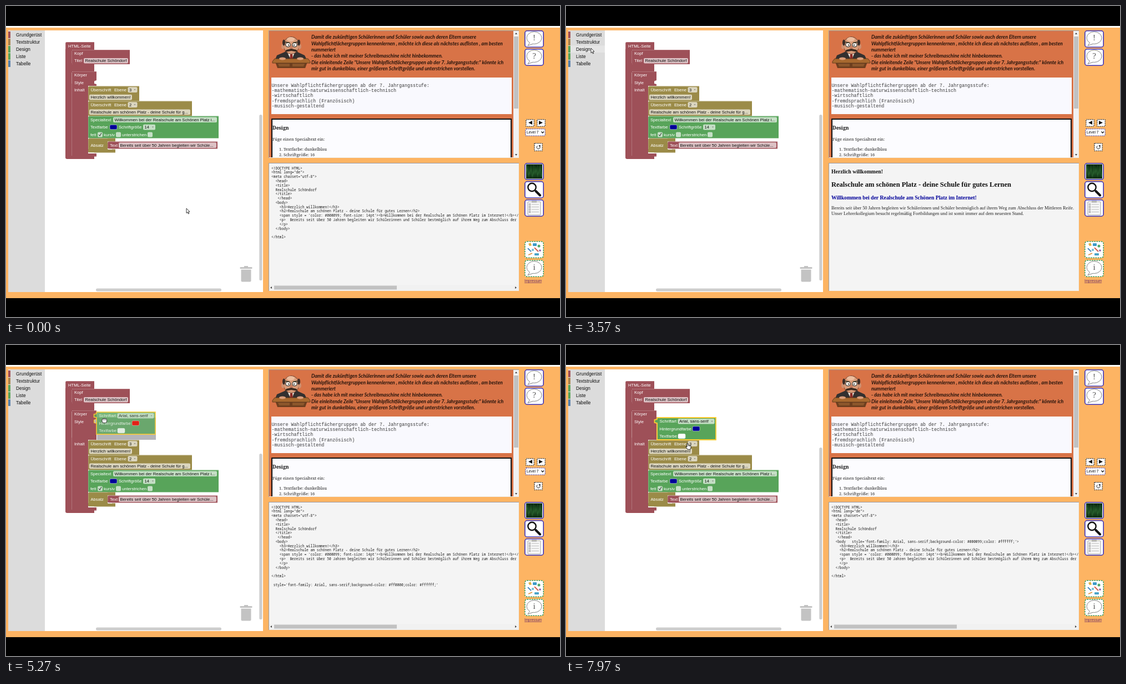
An HTML page with a canvas that plays this animation: 998x561 px, repeating every 8000 ms.

```html
<!DOCTYPE html>
<html lang="de">
<head>
<meta charset="utf-8">
<title>Blockeditor</title>
<style>
html, body { margin: 0; width: 100%; height: 100%; overflow: hidden; background: #000; }
canvas { display: block; }
</style>
</head>
<body>
<canvas id="stage" width="998" height="561"></canvas>
<script>
const c = document.getElementById('stage').getContext('2d');
const LOOP = 8000;
const SANS = '"Liberation Sans", Arial, sans-serif';
const SERIF = '"Liberation Serif", Times, serif';
const BOOK = '"Noto Serif", serif';
const MONO = '"Noto Sans Mono", monospace';
const COURIER = '"Liberation Mono", monospace';
const RED = '#9e5058', OLIVE = '#9b8b48', GREEN = '#58a45a', ORANGE = '#fdb463', NAVY = '#000099';
const GOLD = '#fc3';

// Moments at which the picture switches
const T = { render: 1680, hover: 3400, flyout: 3820, grab: 4420, preview: 4980,
            drop: 5520, picker: 6480, pick: 7540 };

// time, x, y of the pointer
const PATH = [[30, 325, 365], [1150, 947, 328], [1330, 948, 330], [2500, 948, 330], [3300, 41, 79],
  [3560, 45, 76], [3770, 45, 76], [4380, 98, 120], [4670, 109, 120], [5270, 175, 135],
  [5450, 176, 145], [5640, 176, 145], [6200, 233, 151], [6520, 235, 152], [6830, 263, 198],
  [7090, 257, 243], [7230, 257, 244], [7540, 257, 244], [7960, 219, 177]];

const PALETTE = ('fff ccc bbb 999 666 333 000 fcc f66 f00 c00 900 600 300 fc9 f96 f90 f60 c60 930 630 ' +
  'ff9 ff6 fc6 fc3 c93 963 633 ffc ff3 ff0 fc0 990 660 330 9f9 6f9 3f3 3c0 090 060 030 ' +
  '9ff 3ff 6cc 0cc 399 366 033 cff 6ff 3cf 36f 33f 009 006 ccf 99f 66c 63f 60c 339 309 ' +
  'fcf f9f c6c c3c 939 636 303').split(' ');

function pointer(t) {
  let i = PATH.findIndex(k => k[0] > t);
  if (i < 0) i = PATH.length;
  const a = PATH[Math.max(0, i - 1)], b = PATH[Math.min(i, PATH.length - 1)];
  if (a === b) return [a[1], a[2]];
  const u = Math.max(0, Math.min(1, (t - a[0]) / (b[0] - a[0])));
  const e = u * u * (3 - 2 * u);
  return [a[1] + (b[1] - a[1]) * e, a[2] + (b[2] - a[2]) * e];
}

function rect(x, y, w, h, fill) {
  c.fillStyle = fill;
  c.fillRect(x, y, w, h);
}
function round(x, y, w, h, r, fill, stroke, lw = 1) {
  c.beginPath();
  c.roundRect(x, y, w, h, r);
  if (fill) { c.fillStyle = fill; c.fill(); }
  if (stroke) { c.strokeStyle = stroke; c.lineWidth = lw; c.stroke(); }
}
function oval(x, y, rx, ry, fill, stroke, lw = 1) {
  c.beginPath();
  c.ellipse(x, y, rx, ry, 0, 0, 7);
  if (fill) { c.fillStyle = fill; c.fill(); }
  if (stroke) { c.strokeStyle = stroke; c.lineWidth = lw; c.stroke(); }
}
function poly(pts, fill, stroke, lw = 1) {
  c.beginPath();
  for (let i = 0; i < pts.length; i += 2) c.lineTo(pts[i], pts[i + 1]);
  c.closePath();
  if (fill) { c.fillStyle = fill; c.fill(); }
  if (stroke) { c.strokeStyle = stroke; c.lineWidth = lw; c.stroke(); }
}
function line(x1, y1, x2, y2, color, lw = 1) {
  c.beginPath();
  c.moveTo(x1, y1);
  c.lineTo(x2, y2);
  c.strokeStyle = color;
  c.lineWidth = lw;
  c.stroke();
}
function text(s, x, y, size, family, color, style = '') {
  c.font = `${style} ${size}px ${family}`;
  c.fillStyle = color;
  c.fillText(s, x, y + 0.4);
}
function clipped(x, y, w, h, draw) {
  c.save();
  c.beginPath();
  c.rect(x, y, w, h);
  c.clip();
  draw();
  c.restore();
}
function inset(x, y, w, h) {
  rect(x, y + h - 1, w, 1, '#ededed');
  rect(x + w - 1, y, 1, h, '#ededed');
  rect(x, y, w, 1, '#9a9aa2');
  rect(x, y, 1, h, '#9a9aa2');
}

// Block parts
const label = (s, x, y) => text(s, x, y, 7.65, SANS, '#fff');
function block(x, y, w, h, fill) {
  round(x, y, w, h, [3, 0, 0, 2], fill);
  line(x + 2, y + 0.5, x + w, y + 0.5, 'rgba(255,255,255,.2)');
  line(x + 0.5, y + 2, x + 0.5, y + h - 2, 'rgba(255,255,255,.2)');
}
function field(s, x, y, w) {
  round(x, y - 4.7, w, 9.6, 2, 'rgba(255,255,255,.65)');
  text(s, x + 2.5, y, 7.65, SANS, '#111');
}
function dropdown(s, x, y, w) {
  field(s, x, y, w);
  poly([x + w - 6, y - 1, x + w - 3, y - 1, x + w - 4.5, y + 1.3], '#888');
}
function swatch(x, y, fill) {
  round(x, y - 4.2, 13, 8.4, 2, fill, 'rgba(255,255,255,.6)', 0.8);
}
function check(x, y, on) {
  round(x, y - 4.5, 9, 9, 2, 'rgba(255,255,255,.65)');
  if (on) {
    c.beginPath();
    c.moveTo(x + 2, y); c.lineTo(x + 4, y + 2.3); c.lineTo(x + 7, y - 3);
    c.strokeStyle = '#222'; c.lineWidth = 1; c.stroke();
  }
}
function special(x, y, s, fieldW, w, color) {
  block(x, y, w, 40, GREEN);
  label('Specialtext', x + 4, y + 6.7);
  field(s, x + 45, y + 6.7, fieldW);
  label('Textfarbe', x + 4, y + 20);
  swatch(x + 39, y + 20, color);
  label('Schriftgröße', x + 55, y + 20);
  dropdown('14', x + 99, y + 20, 22);
  label('fett', x + 4, y + 33.5);
  check(x + 17, y + 33.5, true);
  label('kursiv', x + 28, y + 33.5);
  check(x + 50, y + 33.5);
  label('unterstrichen', x + 61, y + 33.5);
  check(x + 107, y + 33.5);
}
function stylePath(x, y) {
  c.beginPath();
  c.moveTo(x, y); c.lineTo(x + 106, y); c.lineTo(x + 106, y + 40); c.lineTo(x, y + 40);
  c.lineTo(x, y + 10); c.lineTo(x - 4.5, y + 9); c.lineTo(x - 4.5, y + 4); c.lineTo(x, y + 3);
  c.closePath();
}
function styleBlock(x, y, back, selected) {
  stylePath(x, y);
  c.fillStyle = GREEN;
  c.fill();
  if (selected) { c.strokeStyle = GOLD; c.lineWidth = 1.8; c.stroke(); }
  label('Schriftart', x + 4.5, y + 6.7);
  dropdown('Arial, sans-serif', x + 37.5, y + 6.7, 66);
  label('Hintergrundfarbe', x + 4.5, y + 20);
  swatch(x + 64, y + 20, back);
  label('Textfarbe', x + 4.5, y + 33.5);
  swatch(x + 38, y + 33.5, '#fff');
}

function program(t) {
  const d = t >= T.preview ? 27 : 0;
  // page frame
  block(107, 65, 52, 14, RED);
  rect(107, 78, 12, 194 + d, RED);
  rect(107, 105, 52, 13, RED);
  round(107, 269 + d, 52, 7, [0, 0, 0, 3], RED);
  label('HTML-Seite', 112, 72);
  block(118, 79, 105, 26, RED);
  label('Kopf', 123, 85.3);
  label('Titel', 123, 98.7);
  field('Realschule Schöndorf', 140, 98.7, 80);
  // body
  block(118, 118, 45, 26 + d, RED);
  rect(118, 140 + d, 30, 128, RED);
  round(118, 266 + d, 45, 5.5, [0, 0, 0, 2], RED);
  line(118.5, 120, 118.5, 270 + d, 'rgba(255,255,255,.2)');
  label('Körper', 123, 124.5);
  label('Style', 123, 138);
  if (t < T.drop) {
    const notch = [163, 134, 159, 135.5, 159, 140, 163, 141];
    poly(notch, '#fff', d ? GOLD : null, 1.8);
  }
  label('Inhalt', 123, 151 + d);
  block(148, 144.5 + d, 92, 27, OLIVE);
  label('Überschrift', 152.5, 151 + d);
  label('Ebene', 195, 151 + d);
  dropdown('3', 219.5, 151 + d, 17);
  field('Herzlich willkommen!', 150, 164.5 + d, 77);
  block(148, 171.5 + d, 187, 27, OLIVE);
  label('Überschrift', 152.5, 178 + d);
  label('Ebene', 195, 178 + d);
  dropdown('2', 219.5, 178 + d, 17);
  field('Realschule am schönen Platz - deine Schule für g...', 150, 191.3 + d, 182);
  special(148, 198.5 + d, 'Willkommen bei der Realschule am Schönen Platz i...', 187, 235, NAVY);
  block(148, 238.5 + d, 35, 22, OLIVE);
  rect(183, 238.5 + d, 14, 6, OLIVE);
  round(148, 258.5 + d, 49, 6, [0, 0, 0, 2], OLIVE);
  label('Absatz', 152.5, 251 + d);
  block(183, 244.5 + d, 198, 13, RED);
  // open connections below the last blocks
  line(184, 258 + d, 191, 258.5 + d, '#fff', 1.2);
  line(150, 265 + d, 159, 265.3 + d, '#fff', 1.6);
  label('Text', 187, 251 + d);
  field('Bereits seit über 50 Jahren begleiten wir Schüle...', 203, 251 + d, 176);
}

function picker() {
  round(196, 163.5, 78, 109, 2, '#fff', '#bbb', 0.8);
  poly([229, 164, 235, 158, 241, 164], '#fff');
  PALETTE.forEach((p, i) =>
    rect(198.3 + (i % 7) * 10.4, 167.2 + Math.floor(i / 7) * 10.58, 9.6, 9.7, '#' + p));
}

function editor(t, [px, py]) {
  const open = t >= T.flyout && t < T.grab;
  rect(4, 44, 66, 472, '#dcdcdc');
  rect(70, 44, 393, 472, '#fff');
  ['Grundgerüst', 'Textstruktur', 'Design', 'Liste', 'Tabelle'].forEach((s, i) => {
    const y = 52 + 13 * i, col = [RED, '#a5814f', GREEN, GREEN, '#5580ad'][i];
    const on = i === 2 && open;
    if (i === 2 && t >= T.hover && t < T.flyout) rect(8, y - 6.5, 62, 12.5, 'rgba(255,255,255,.25)');
    if (on) rect(4, y - 6.5, 66, 12.5, col);
    rect(4, y - 6, 4, 12, col);
    text(s, 18, y, 8.34, SANS, on ? '#fff' : '#111');
  });

  program(t);
  // bin
  round(421.5, 471, 22, 3, 1, '#c3c3c3');
  rect(429, 469, 7, 2, '#c3c3c3');
  round(423.5, 475.5, 18, 22, [0, 0, 2, 2], '#c3c3c3');
  // scrollbars
  const top = t < T.drop ? 196 : 185;
  round(456.3, top, 5.2, 495 - top, 2.6, '#cdcdcd');
  round(162, 509.5, 226, 5.2, 2.6, '#cdcdcd');

  if (open) {
    round(70, 44, 150, 472, [0, 6, 6, 0], 'rgba(221,221,221,.85)');
    special(82, 53, 'Text', 22, 121, '#f00');
    styleBlock(86, 106.5, '#f00');
  } else if (t >= T.grab && t < T.drop) {
    if (t >= T.preview) { stylePath(164, 131); c.fillStyle = '#b5b5b9'; c.fill(); }
    c.save();
    c.globalAlpha = 0.8;
    styleBlock(px - 12, py - 14, '#f00', true);
    c.restore();
  } else if (t >= T.drop) {
    styleBlock(164, 131, t < T.pick ? '#f00' : NAVY, true);
    if (t >= T.picker && t < T.pick) picker();
  }
}

function teacher() {
  poly([484, 99, 488, 89, 502, 83, 525, 83, 538, 89, 543, 99], '#33302f');
  poly([507, 84, 520, 84, 514, 99], '#eee4d8');
  poly([512, 87, 516, 87, 517, 97, 511, 97], '#8c2a24');
  oval(514, 71, 14, 15.5, '#d99c79', '#5a3324', 0.8);
  oval(499, 73, 3, 5, '#cf9070');
  oval(529, 73, 3, 5, '#cf9070');
  oval(500.5, 66, 2.5, 5.5, '#3a2c27');
  oval(527.5, 66, 2.5, 5.5, '#3a2c27');
  oval(513, 60, 7, 4, '#edbd9d');
  oval(508, 70, 4.3, 3.7, '#f5eee6', '#222', 1.1);
  oval(520, 70, 4.3, 3.7, '#f5eee6', '#222', 1.1);
  oval(509, 70.5, 1.1, 1.1, '#111');
  oval(519, 70.5, 1.1, 1.1, '#111');
  line(503, 65, 511, 66.5, '#332', 1.4);
  line(525, 65, 517, 66.5, '#332', 1.4);
  oval(514, 75, 2.8, 3.3, '#c57e60');
  poly([514, 77, 523, 79, 526, 83, 514, 81, 502, 83, 505, 79], '#39291f');
  poly([485, 101, 543, 101, 539, 112, 489, 112], '#6e3f1f');
  poly([490, 104, 511, 104, 511, 109, 492, 109], '#8c562b');
  poly([516, 104, 538, 104, 536, 109, 516, 109], '#8c562b');
  poly([484, 95, 544, 95, 548, 100, 548, 103, 480, 103, 480, 100], '#a8692f', '#51301a', 0.8);
  oval(498, 95, 6, 2.6, '#d99c79');
  oval(530, 95, 6, 2.6, '#d99c79');
}

function arrowHead(x, y, s, vertical) {
  poly(vertical ? [x - 2, y, x + 2, y, x, y + s] : [x, y - 2, x, y + 2, x + s, y], '#444');
}

function task() {
  clipped(473, 44, 451, 230, () => {
    rect(473, 44, 451, 230, '#d87347');
    teacher();
    ['Damit die zukünftigen Schülerinnen und Schüler sowie auch deren Eltern unsere',
     'Wahlpflichtfächergruppen kennenlernen , möchte ich diese als nächstes auflisten , am besten',
     'nummeriert',
     '- das habe ich mit meiner Schreibmaschine nicht hinbekommen.',
     'Die einleitende Zeile "Unsere Wahlpflichtfächergruppen ab der 7. Jahrgangsstufe:" könnte ich',
     'mir gut in dunkelblau, einer größeren Schriftgröße und unterstrichen vorstellen.'
    ].forEach((s, i) => text(s, 550, 56 + 11.45 * i, 8.9, 'Lato, cursive', '#24130c', 'italic bold'));

    rect(478, 129, 433, 66, '#f9f9fe');
    ['Unsere Wahlpflichtfächergruppen ab der 7. Jahrgangsstufe:',
     '-mathematisch-naturwissenschaftlich-technisch', '-wirtschaftlich',
     '-fremdsprachlich (Französisch)', '-musisch-gestaltend'
    ].forEach((s, i) => text(s, 478.5, 143 + 9.4 * i, 8.32, COURIER, '#3c3c3c'));

    rect(478, 203, 433, 80, '#111');
    rect(480, 205, 429, 78, '#fcfcff');
    text('Design', 480, 220.5, 8.7, BOOK, '#111', 'bold');
    text('Füge einen Specialtext ein:', 480, 240, 7.4, BOOK, '#222');
    text('1. Textfarbe: dunkelblau', 492, 258.5, 7.4, BOOK, '#222');
    text('2. Schriftgröße: 16', 492, 268.3, 7.4, BOOK, '#222');

    rect(914, 44, 10, 230, '#f1f1f1');
    rect(915, 55, 8, 130, '#c1c1c1');
    arrowHead(919, 51, -3, true);
    arrowHead(919, 267, 3, true);
  });
  inset(473, 44, 451, 230);
}

function codeLines(t) {
  const style = `style='font-family: Arial, sans-serif;background-color: ${t < T.pick ? '#ff0000' : NAVY};color: #ffffff;'`;
  const rows = ['<!DOCTYPE HTML>', '<html lang="de">', '<meta charset="utf-8">', '  <head>', '  <title>',
    '  Realschule Schöndorf', '  </title>', '   </head>',
    t >= T.drop ? `  <body   ${style}>` : '  <body>',
    '    <h3>Herzlich willkommen!</h3>',
    '    <h2>Realschule am schönen Platz - deine Schule für gutes Lernen</h2>',
    "    <span style = 'color: #000099; font-size: 14pt'><b>Willkommen bei der Realschule am Schönen Platz im Internet!</b></span>",
    '    <p>  Bereits seit über 50 Jahren begleiten wir Schülerinnen und Schüler bestmöglich auf ihrem Weg zum Abschluss der Mittleren Reife.',
    '    </p>', '  </body>', '', '</html>'];
  if (t >= T.grab && t < T.drop) rows.push('', ' ' + style);
  return rows;
}

function output(t) {
  rect(473, 283, 451, 231, '#f4f4f4');
  clipped(474, 284, 450, 229, () => {
    if (t >= T.render && t < T.grab) {
      text('Herzlich willkommen!', 478, 299.5, 9.76, SERIF, '#111', 'bold');
      text('Realschule am schönen Platz - deine Schule für gutes Lernen', 478, 322.5, 12.5, SERIF, '#111', 'bold');
      text('Willkommen bei der Realschule am Schönen Platz im Internet!', 478, 345.7, 9.72, SERIF, NAVY, 'bold');
      text('Bereits seit über 50 Jahren begleiten wir Schülerinnen und Schüler bestmöglich auf ihrem Weg zum Abschluss der Mittleren Reife.', 478, 364.5, 8.34, SERIF, '#222');
      text('Unser Lehrerkollegium besucht regelmäßig Fortbildungen und ist somit immer auf dem neuesten Stand.', 478, 374, 8.34, SERIF, '#222');
      return;
    }
    codeLines(t).forEach((s, i) => text(s, 478, 292.5 + 7.78 * i, 6.2, MONO, '#1c1c1c'));
    rect(474, 503, 449, 10, '#f1f1f1');
    rect(483, 504.5, 221, 7, '#c1c1c1');
    arrowHead(479, 508, -3);
    arrowHead(917, 508, 3);
  });
  inset(473, 283, 451, 231);
}

function tile(x, y, w, h, color, dash, r = 4) {
  c.setLineDash(dash || []);
  round(x + 0.8, y + 0.8, w - 1.6, h - 1.6, r, '#fff', color, 1.6);
  c.setLineDash([]);
}
function bubble(y, s) {
  oval(951.5, y - 0.5, 13.5, 11, '#fff', '#777', 0.9);
  poly([944, y + 7, 940, y + 13.5, 950, y + 9.5], '#fff');
  line(943.5, y + 8.3, 940, y + 13.5, '#777', 0.9);
  line(940, y + 13.5, 949, y + 10.4, '#777', 0.9);
  c.textAlign = 'center';
  text(s, 951.5, y, 15, SERIF, '#555');
  c.textAlign = 'left';
}

function buttons() {
  const blue = '#3d2fb0', green = '#2c9a5c', dots = [1.6, 1.6];
  tile(934, 44, 35, 31, blue);
  bubble(58, '!');
  tile(934, 77, 35, 31, blue);
  bubble(91, '?');

  tile(936, 204, 16, 14, '#333', dots, 1);
  poly([948, 207, 948, 214, 941, 210.5], '#111');
  tile(956, 204, 16, 14, '#333', dots, 1);
  poly([960, 207, 960, 214, 967, 210.5], '#111');
  tile(935, 221, 37, 14, '#5a50a8', dots, 2);
  text('Level 7', 938, 228, 6.7, SANS, '#111');
  c.beginPath();
  c.moveTo(964.5, 226.5); c.lineTo(966.7, 229); c.lineTo(969, 226.5);
  c.strokeStyle = '#111'; c.lineWidth = 1.2; c.stroke();
  tile(951, 247, 16, 15, '#333', dots, 1);
  c.beginPath();
  c.arc(959, 254.8, 3, -0.6, 4.2);
  c.strokeStyle = '#222'; c.lineWidth = 1; c.stroke();
  poly([959.3, 251.2, 963, 251, 962, 254.5], '#222');

  // green rain thumbnail
  tile(934, 283, 35, 31, blue);
  rect(937, 285.5, 29, 26, '#0c2a10');
  for (let i = 0; i < 12; i++) {
    const y = 286 + (i * 7) % 5, g = c.createLinearGradient(0, y, 0, 311);
    g.addColorStop(0, '#123d17');
    g.addColorStop(0.35 + ((i * 5) % 7) / 15, '#3f8b45');
    g.addColorStop(1, '#0c2a10');
    rect(938 + i * 2.35, y, 1.2, 311 - y, g);
  }
  tile(934, 316, 35, 31, blue);
  oval(947.5, 327, 7.2, 7.2, '#fff', '#111', 2.4);
  c.lineCap = 'round';
  line(954.5, 334, 962, 341.5, '#111', 4.2);
  c.lineCap = 'butt';
  tile(934, 349, 35, 31, blue);
  round(940, 353, 23, 24, 1, '#f7f7f7', '#999', 0.9);
  rect(947, 351.5, 9, 3, '#aaa');
  for (let y = 358; y < 376; y += 4.5) {
    c.strokeStyle = '#888';
    c.lineWidth = 0.7;
    c.strokeRect(942.5, y - 1.2, 2.4, 2.4);
    line(947, y, 960, y, '#aaa', 0.8);
  }

  tile(934, 424, 35, 31, green, [2.4, 1.8]);
  round(949, 428, 7, 5, 1, '#3c9bc9');
  poly([941, 429, 945, 427, 947, 432, 943, 433], '#e0b145');
  oval(960, 433, 2.5, 2.5, '#53a96c');
  line(940, 437, 946, 443, '#4185bd', 1.8);
  line(952, 436, 959, 443, '#d15a4b', 1.8);
  round(947, 438, 4, 4, 1, '#7bc5d8');
  line(941, 449, 948, 446, '#e0913c', 1.8);
  round(952, 446, 8, 4, 1, '#4ba4c9');
  oval(962, 441, 1.8, 1.8, '#885aa8');
  tile(934, 458, 35, 31, green, [2.4, 1.8]);
  bubble(472, 'i');
  text('Impressum', 934, 495.7, 6.35, SANS, '#6a2a66');
  line(934, 499.3, 965, 499.3, '#6a2a66', 0.7);
}

function cursor(t, [x, y]) {
  c.save();
  c.translate(x, y);
  c.lineJoin = 'round';
  if (t >= T.grab && t < T.drop) {
    round(-2, -2.5, 8.5, 8, 3, '#fff', '#222', 0.9);
    for (let i = 0; i < 3; i++) line(0.3 + i * 2, -2, 0.3 + i * 2, 0.8, '#333', 0.7);
  } else if (x > 934 || t > 6050 || (t > 4100 && t < T.grab)) {
    poly([-1, 0.6, 0, -0.2, 1, 0.6, 1, 4, 3.2, 4, 5.6, 4.8, 6.2, 6, 5.8, 9, 5, 11.3,
          0, 11.3, -2.8, 7.3, -3, 6, -1.8, 6, -1, 7], '#fff', '#111', 0.9);
    line(2.2, 4.5, 2.2, 6.3, '#333', 0.6);
    line(4, 4.8, 4, 6.5, '#333', 0.6);
  } else {
    poly([0, 0, 0, 8.6, 2, 6.8, 3.4, 10, 4.8, 9.4, 3.4, 6.3, 6, 6.1], '#fff', '#222', 0.9);
  }
  c.restore();
}

function draw(t) {
  const p = pointer(t);
  rect(0, 0, 998, 561, '#000');
  rect(0, 36, 998, 3, '#fff');
  rect(0, 39, 998, 488, ORANGE);
  editor(t, p);
  task();
  output(t);
  buttons();
  cursor(t, p);
}

c.textBaseline = 'middle';
const start = performance.now();
function tick() {
  draw((performance.now() - start) % LOOP);
  requestAnimationFrame(tick);
}
tick();
</script>
</body>
</html>
```
